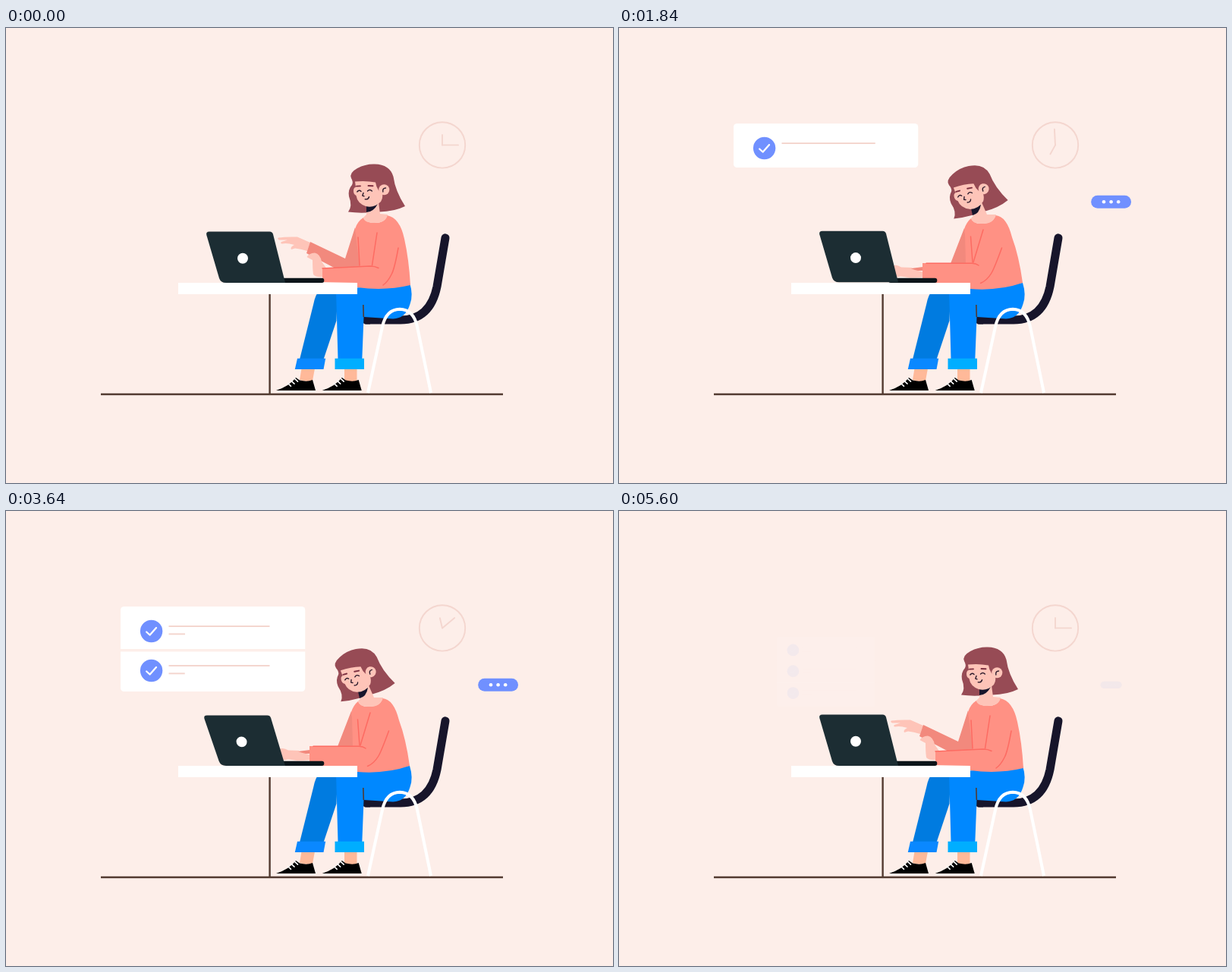
These frames come from a looping animation (800x600 px, 6000 ms). An HTML page with a canvas:

```html
<!DOCTYPE html>
<html lang="en">
<head>
<meta charset="utf-8">
<title>Working at a desk</title>
<style>
  html, body { margin: 0; width: 100%; height: 100%; overflow: hidden; background: #fdeee9; }
  canvas { display: block; width: 800px; height: 600px; }
</style>
</head>
<body>
<canvas id="stage" width="800" height="600"></canvas>
<script>
const ctx = document.getElementById('stage').getContext('2d');
const LOOP = 6000, LAST_CHANGE = 5600;
const BG = '#fdeee9', BROWN = '#523a30', NAVY = '#17152b', SKIN = '#fec4b8', ANKLE = '#ffb999',
  CORAL = '#ff9184', CORAL_DARK = '#f2897d', CREASE = '#fd6b62', HAIR = '#974b55',
  BLUE = '#0088ff', PERIWINKLE = '#7090ff', FAINT = '#f4d6cf', INK = '#2b1a2b';

const clamp = x => Math.max(0, Math.min(1, x));

// cubic-bezier(.4, 0, .2, 1)
function ease(x) {
  let lo = 0, hi = 1, s = 0.5;
  for (let i = 0; i < 20; i++) {
    s = (lo + hi) / 2;
    const bx = 1.2 * s * (1 - s) ** 2 + 0.6 * s * s * (1 - s) + s ** 3;
    if (bx < x) lo = s; else hi = s;
  }
  return x <= 0 ? 0 : x >= 1 ? 1 : 3 * s * s - 2 * s ** 3;
}
const tween = (t, start, duration) => ease(clamp((t - start) / duration));

// Blends two path strings that share the same commands.
function blend(a, b, k) {
  const ends = b.match(/-?[\d.]+/g);
  let i = 0;
  return a.replace(/-?[\d.]+/g, n => (+n + (ends[i++] - n) * k).toFixed(2));
}

function fill(path, color) {
  ctx.fillStyle = color;
  ctx.fill(new Path2D(path));
}
function stroke(path, color, width, cap = 'round') {
  ctx.strokeStyle = color;
  ctx.lineWidth = width;
  ctx.lineCap = cap;
  ctx.lineJoin = 'round';
  ctx.stroke(new Path2D(path));
}
function circle(x, y, r, color) {
  ctx.beginPath();
  ctx.arc(x, y, r, 0, Math.PI * 2);
  ctx.fillStyle = color;
  ctx.fill();
}
function roundRect(x, y, w, h, r, color) {
  ctx.beginPath();
  ctx.roundRect(x, y, w, h, r);
  ctx.fillStyle = color;
  ctx.fill();
}
function group(draw) {
  ctx.save();
  draw();
  ctx.restore();
}
function scaleAbout(x, y, s) {
  ctx.translate(x, y);
  ctx.scale(s, s);
  ctx.translate(-x, -y);
}
function rotateAbout(x, y, degrees) {
  ctx.rotate(0);
  ctx.translate(x, y);
  ctx.rotate(degrees * Math.PI / 180);
  ctx.translate(-x, -y);
}

function clock(t) {
  const x = 575, y = 154.4, turn = 360 * tween(t, 0, 4790);
  ctx.beginPath();
  ctx.arc(x, y, 30.2, 0, Math.PI * 2);
  ctx.strokeStyle = FAINT;
  ctx.lineWidth = 1.9;
  ctx.stroke();
  for (const [angle, length] of [[turn, 13.5], [90 + turn * 3, 21]]) group(() => {
    rotateAbout(x, y, angle);
    stroke(`M${x} ${y}V${y - length}`, FAINT, 1.9);
  });
}

// Each task: its row, and the start times of its two text lines.
const TASKS = [[158.5, 1570, 1840], [210.5, 3130, 3300], [264.5, 4676, 4844]];

function taskList(t, leave) {
  const enter = tween(t, 1150, 550), show = enter * (1 - leave);
  if (show <= 0) return;
  const bottom = 184 + 54 * tween(t, 2440, 400) + 60 * tween(t, 3980, 400);
  group(() => {
    ctx.globalAlpha = show;
    scaleAbout(272.7, (126 + bottom) / 2, 0.5 + show / 2);
    roundRect(151, 126, 243.3, bottom - 126, 4.5, '#fff');
    for (const [y, start] of [[182, 2336], [236, 3862]]) {
      const w = 244 * tween(t, start, 400);
      ctx.fillStyle = BG;
      ctx.fillRect(272.7 - w / 2, y, w, 3.4);
    }
    for (const [y, first, second] of TASKS) {
      const pop = tween(t, first - 300, 250), tick = tween(t, first - 150, 200);
      if (pop) circle(191.6, y, 14.7 * pop, PERIWINKLE);
      if (tick) group(() => {
        ctx.setLineDash([19.2 * tick, 30]);
        stroke(`M185.2 ${y + 1}L189.6 ${y + 5}L198 ${y - 4.5}`, '#fff', 2.3);
      });
      const line = (dy, length, start) => {
        const w = length * tween(t, start, 400);
        if (w) stroke(`M214.5 ${y + dy}h${w}`, FAINT, 2, 'butt');
      };
      line(-6.5, 133, first);
      line(3.8, 21.5, second);
    }
  });
}

function bubble(t, leave) {
  const show = tween(t, 700, 500) * (1 - leave);
  if (show <= 0) return;
  group(() => {
    ctx.globalAlpha = show;
    scaleAbout(648.6, 229.4, 0.5 + show / 2);
    roundRect(622.2, 220.8, 52.8, 17, 8.5, PERIWINKLE);
    for (let i = 0; i < 3; i++) {
      const wave = Math.max(0, Math.cos((t - 1100 + 60 * i) / 1000 * Math.PI * 2));
      ctx.globalAlpha = show * (1 - 0.55 * wave ** 4);
      circle(639 + 9.6 * i, 229.3, 2.3, '#fff');
    }
  });
}

function shoe(x) {
  group(() => {
    ctx.translate(x, 0);
    fill('M0 478Q18 472 26 461L31 464.5Q41 467 48 464L52 478Z', '#000');
    for (const [lx, ly] of [[15.5, 468.5], [20, 465.3], [24.5, 462.3]])
      stroke(`M${lx} ${ly}l4 3.8`, '#fff', 1.6);
  });
}

function chairAndLegs() {
  stroke('M125 483H655', BROWN, 2.4, 'butt');
  stroke('M347.6 350V483', BROWN, 2.4, 'butt');
  stroke('M579 276.8L568 341Q559 385 520 385H475', NAVY, 11);
  fill('M471 379H480V390.5H474Q471 390.5 471 387Z', NAVY);

  fill('M389.5 449H407L404 465Q395 467 387 464Z', ANKLE);
  fill('M446 449H462.5V465Q454 468 446 464Z', ANKLE);
  shoe(356);
  shoe(416.7);
  fill('M412 348H437L435.5 386L418.5 437H387L405.5 363Q408 351 412 348Z', '#007be0');
  fill('M435 345L532 336Q537 352 532.5 364Q527 383 510 383.5L471.5 381L469.3 437H437.5Z', BLUE);
  stroke('M470.8 365L471.3 381', BROWN, 1.6, 'butt');
  fill('M384 435.7H421.2L418.5 450H380.8Z', '#0a88ff');
  fill('M433.5 435.7H472V450H433.5Z', '#00aeff');
  stroke('M477 481L496 394Q501 371 519 370.8Q537 371 542 394L560 481', '#fff', 4, 'butt');
}

function woman(t, lean, typing) {
  const pose = (a, b) => blend(a, b, lean);
  const tap = typing * Math.sin(t / 50);
  const nod = t > 600 && t < 4800 ? 2 * Math.sin(Math.PI * (t - 600) / 4200) ** 2 : 0;
  const inHead = draw => group(() => {
    rotateAbout(478, 245, -nod);
    ctx.translate(-17 * lean, -lean);
    rotateAbout(498, 213, -12 * lean);
    draw();
  });

  // far arm
  group(() => {
    ctx.translate(0, tap * 0.8);
    fill(pose('M359 276.5Q368 275 384 275.5L401 283L397 294Q388 291 381 290.5L376 292Q374 289 380 286Q370 283 364 284.5Q361 284 363 282L371 279.5L360 279.5Q357 278 359 276.5Z',
      'M361 314Q366 312 372 316L386 316.5L388 322Q384 324 380 325L376 327Q373 328 371 328Q368 329 365 329Q361 329 359 327L358 323L358 317Q359 315 361 314Z'), SKIN);
  });
  fill(pose('M401 282L447 304L460 263L466 316L436 318L396 297Z',
    'M385 317L437 310.5L455 264L460 311L440 320L387 320Z'), CORAL_DARK);

  // near hand
  group(() => {
    ctx.translate(0, -tap * 0.6);
    fill(pose('M417 317L422 316.5L416 308Q414 298 407 296.5Q399 297 396.5 302Q400 304 404 306Q404 318 405 325Q409 329 417 328Z',
      'M400 321L400 321L390 318.5Q382 315 376 317Q370 319 368 322Q366 326 372 327Q378 328 384 329Q392 329 401 328Z'), SKIN);
  });

  // sweater
  fill(pose('M471 250Q463 255 460 265L460 315L417 317L417 335L463 336L463 342Q500 347 533 339Q531 305 525 278Q519 250 502 247Q500 257 486 257Q473 257 471 250Z',
    'M464 251Q458 256 455 265L456 310L400 310L400 336L463 336L463 344Q500 347 532 336Q527 300 518 276Q511 248 496 247Q494 257 480 258Q467 259 464 251Z'), CORAL);
  fill(pose('M460 265L460 265L466 314L460 315Z', 'M455 265L456 272L457 310L454 310Z'), CORAL_DARK);
  const creases = [
    ['M417 317L480 314Q486 314 491 316.5', 'M405 310.3L464 310.3Q470 310 474 313'],
    ['M464 276L466 313', 'M463.5 275L466 309'],
    ['M489 270L482.5 313', 'M480 266L467 309'],
    ['M517 290Q512 318 508 325Q503 335 497 339', 'M504.5 290Q495 316 491 323Q485 333 476.5 336.5'],
  ];
  for (const [a, b] of creases) stroke(pose(a, b), CREASE, 1.5);

  // head
  inHead(() => fill('M455 198Q452 191 463 185Q474 179 486 179.5Q506 180 510.5 196Q513 215 526 235Q512 242 492 242.5L475 243.5Q462 244 451 242.5Q457 235 452 222Q450.5 213 456 207Q458 203 455 198Z', HAIR));
  fill(pose('M475 234L491 230L493 245L503 246Q501 257 486 257Q472 257 471 250L475 246Z',
    'M464 238L478 230L485 246L497 246Q494 258 480 258Q466 259 464 251L468 246Z'), SKIN);
  fill(pose('M475 234L490 232Q484 243 475 243Z', 'M464 238L477 233Q475 245 466 247Z'), NAVY);
  inHead(() => {
    fill('M460 202.5Q474 201 487 203.5Q488 210 491 214L496 218Q497 224 494 229Q485 238 474 235Q463 231 461.5 221Q457.5 219 458 214Q458.5 210 461 210Z', SKIN);
    circle(498.3, 213.3, 7, SKIN);
    stroke('M462 208.6L467 208.4M477.5 208L483.5 208.2', '#7d2f40', 1.9);
    stroke('M462.8 216Q465.5 212.8 468 215.5M476.5 215Q479.5 212 482.3 215', INK, 1.4);
    stroke('M471 217.5L469.8 221L472 221.8M473.3 225.8Q477.5 226.5 478.5 222.8', INK, 1.4);
    stroke('M496.8 216Q496 211 500.5 211', INK, 1.4);
  });
}

function deskAndLaptop(t, typing) {
  fill('M227 336H463V351H227Z', '#fff');
  roundRect(355, 329.8, 64.3, 6.2, 3, '#0c151a');
  const push = typing * Math.max(0, Math.cos((t - 140) / 500 * Math.PI * 2)) ** 2;
  group(() => {
    ctx.translate(0, 336 - typing * (1 - push) * 0.7);
    ctx.transform(1, 0, 0.045 * push, 1 - 0.015 * push, 0, 0);
    ctx.translate(0, -336);
    fill('M268 268.5H347.5Q351 268.5 352 272L368 336H290Q283 336 281 330L264.3 273Q263.2 268.5 268 268.5Z', '#1c2d33');
    circle(312, 303.8, 7, '#fff');
  });
}

function frame(now) {
  const t = Math.min(now % LOOP, LAST_CHANGE);
  const lean = tween(t, 0, 800) - tween(t, 4820, 780);
  const leave = tween(t, 5050, 800);
  const typing = clamp((t - 630) / 80) * clamp((4820 - t) / 80);

  ctx.fillStyle = BG;
  ctx.fillRect(0, 0, 800, 600);
  clock(t);
  taskList(t, leave);
  bubble(t, leave);
  chairAndLegs();
  woman(t, lean, typing);
  deskAndLaptop(t, typing);
  requestAnimationFrame(() => frame(performance.now() - start));
}
const start = performance.now();
frame(0);
</script>
</body>
</html>
```
